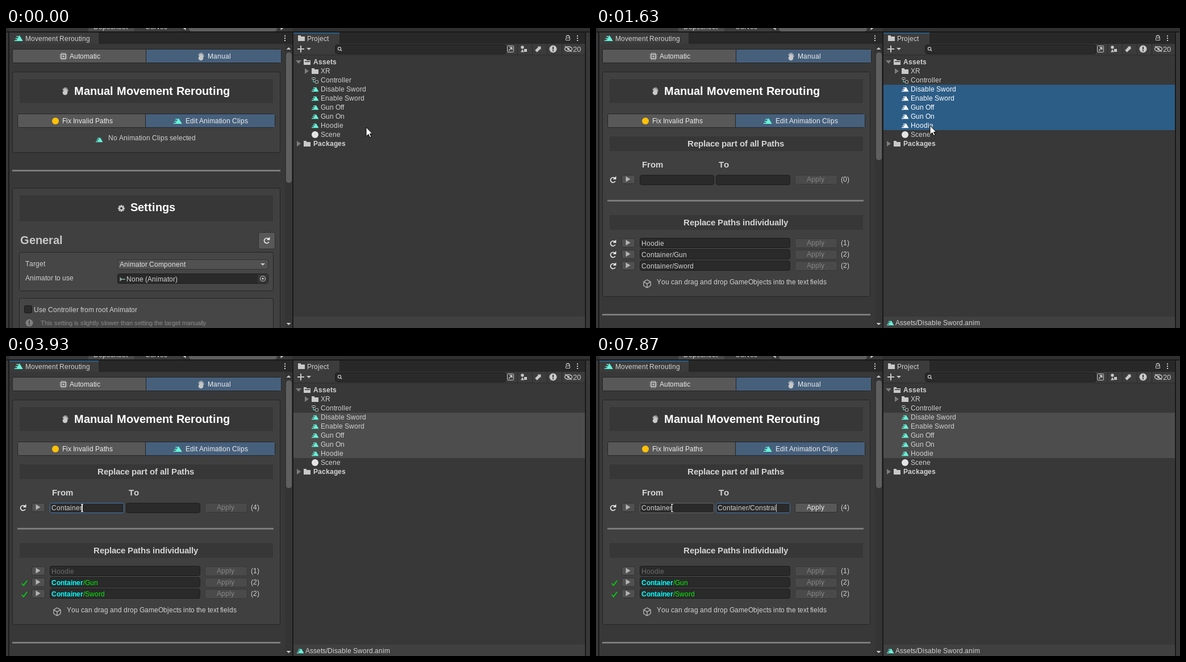
These frames come from a looping animation (1028x529 px, 8 s). An HTML page with a canvas:

```html
<!DOCTYPE html>
<html lang="en">
<head>
<meta charset="utf-8">
<title>Editor panel</title>
<style>
html, body { margin: 0; width: 100%; height: 100%; overflow: hidden; background: #383838; }
canvas { display: block; }
</style>
</head>
<body>
<canvas id="stage" width="1028" height="529"></canvas>
<script>
const g = document.getElementById('stage').getContext('2d');
const LOOP = 8000;
const TEAL = '#66f3da', BLUE = '#46607c', FOCUS = '#3a79bb', EDGE = '#242424', ICON = '#c8c8c8', TEXT = '#d2d2d2';
const CLIPS = ['Disable Sword', 'Enable Sword', 'Gun Off', 'Gun On', 'Hoodie'];
const TIME = { pickOne: 570, showOne: 800, pickAll: 1330, showAll: 1400, hover: 2100, focusFrom: 2200, beam: 2270, focusTo: 4370 };

const MOVES = [
  { start: 80, end: 330, dx: -44, dy: -72 },
  { start: 800, end: 1170, dx: -2, dy: 69 },
  { start: 1640, end: 2100, dx: -456, dy: 95 }
];
// Keys come in pairs: one pair per period, the second key a gap after the first.
const FROM_RUNS = [
  { text: 'C', start: 2670 },
  { text: 'ontainer', start: 2930, period: 273, gap: 180 }
];
const TO_RUNS = [
  { text: 'Container', start: 4830, period: 267, gap: 90 },
  { text: '/', start: 6430 },
  { text: 'Constrai', start: 6900, period: 305, gap: 55 }
];

function typed(runs, t) {
  return runs.map(({ text, start, period = 0, gap = 0 }) =>
    [...text].filter((_, i) => t >= start + Math.floor(i / 2) * period + i % 2 * gap).join('')).join('');
}

// ---------- primitives ----------
function rect(x0, y0, x1, y1, color) {
  g.fillStyle = color;
  g.fillRect(x0, y0, x1 - x0, y1 - y0);
}

function box(x0, y0, x1, y1, fill, border = EDGE, radius = 3) {
  g.beginPath();
  g.roundRect(x0 + .5, y0 + .5, x1 - x0 - 1, y1 - y0 - 1, radius);
  g.fillStyle = fill;
  g.fill();
  g.lineWidth = 1;
  g.strokeStyle = border;
  g.stroke();
}

// Advances snap to whole pixels, as in a hinted interface font.
function text(str, x, y, color = TEXT, size = 12, bold = false) {
  g.font = `${bold ? 'bold ' : ''}${size}px "Liberation Sans", Arial, sans-serif`;
  g.fillStyle = color;
  for (const ch of str) {
    g.fillText(ch, x, y);
    x += Math.round(g.measureText(ch).width);
  }
  return x;
}

const heading = (str, x, y, size, color = '#d4d4d4') => text(str, x, y, color, size, true);

function line(x0, y0, x1, y1, color = ICON, width = 1.5) {
  g.beginPath();
  g.moveTo(x0, y0);
  g.lineTo(x1, y1);
  g.strokeStyle = color;
  g.lineWidth = width;
  g.stroke();
}

function dot(x, y, r, color = ICON) {
  g.beginPath();
  g.arc(x, y, r, 0, 7);
  g.fillStyle = color;
  g.fill();
}

function ring(x, y, r, width = 1.5, from = 0, to = 2 * Math.PI, color = ICON) {
  g.beginPath();
  g.arc(x, y, r, from, to);
  g.strokeStyle = color;
  g.lineWidth = width;
  g.stroke();
}

// Triangle pointing right, turned by quarter turns.
function arrow(x, y, length, half, quarters = 0, color = ICON) {
  g.save();
  g.translate(x, y);
  g.rotate(quarters * Math.PI / 2);
  g.beginPath();
  g.moveTo(-length / 2, -half);
  g.lineTo(length / 2, 0);
  g.lineTo(-length / 2, half);
  g.fillStyle = color;
  g.fill();
  g.restore();
}

// ---------- icons ----------
function clipIcon(x, y, color = TEAL, scale = 1) {
  arrow(x + 1.5 * scale, y, 8.5 * scale, 5 * scale, 3, color);
  for (let i = 0; i < 3; i++) {
    const h = y + (i * 3 - 2.5) * scale;
    line(x - (3 + i * 1.5) * scale, h, x - (i * 1.5 - .5) * scale, h, color, 1.5);
  }
}

function handIcon(x, y) {
  dot(x, y + 3, 4.3);
  for (let i = 0; i < 5; i++) {
    const a = -2.3 + i * .5, reach = 7 - Math.abs(i - 1.8) * .6;
    line(x, y + 2, x + reach * Math.cos(a), y + 1 + 1.1 * reach * Math.sin(a), ICON, 1.8);
  }
}

function chipIcon(x, y) {
  for (const k of [-3, 0, 3]) {
    line(x + k, y - 6.5, x + k, y + 6.5, ICON, 1);
    line(x - 6.5, y + k, x + 6.5, y + k, ICON, 1);
  }
  [[4.5, ICON], [3, '#585858'], [1.5, ICON]].forEach(([r, color]) => rect(x - r, y - r, x + r, y + r, color));
}

function gearIcon(x, y) {
  for (let a = 0; a < 3; a += Math.PI / 4) {
    const c = 6 * Math.cos(a), s = 6 * Math.sin(a);
    line(x - c, y - s, x + c, y + s, ICON, 2.6);
  }
  dot(x, y, 4.6);
  dot(x, y, 2, '#373737');
}

function refreshIcon(x, y) {
  ring(x, y, 4.4, 1.8, .5, 5.4, '#e6e6e6');
  arrow(x + 4, y - 2.5, 4, 4, .5, '#e6e6e6');
}

function folderIcon(x, y, open) {
  rect(x - 6, y - 5, x - 1, y - 2, ICON);
  rect(x - 6, y - 3, x + 6, y + 5, ICON);
  if (open) rect(x - 4, y - 1.5, x + 5, y, '#383838');
}

function controllerIcon(x, y) {
  line(x - 3, y - 2, x - 3, y + 3, TEAL, 1);
  line(x - 3, y + 3, x + 1, y + 3, TEAL, 1);
  box(x - 6, y - 5, x + 1, y - 1, '#383838', ICON, 1);
  box(x, y, x + 6, y + 6, '#383838', ICON, 1);
}

function cubeIcon(x, y) {
  for (let i = 0; i < 6; i++) {
    const corner = k => [x + 7 * Math.sin(k * Math.PI / 3), y + 7 * Math.cos(k * Math.PI / 3)];
    line(...corner(i), ...corner(i + 1), ICON, 1.2);
    if (i % 2 === 0) line(x, y, ...corner(i), ICON, 1.2);
  }
}

function noticeIcon(x, y, color, mark) {
  dot(x, y, 6.5, color);
  rect(x - 1, y - 4, x + 1, y + 1, mark);
  rect(x - 1, y + 2, x + 1, y + 4, mark);
}

function checkIcon(x, y) {
  line(x - 4, y, x - 1, y + 4, '#00cc10', 2);
  line(x - 1.5, y + 4, x + 5, y - 5, '#00cc10', 2);
}

const kebab = (x, y) => [-4, 0, 4].forEach(k => rect(x - 1, y + k - 1, x + 1, y + k + 1, TEXT));

// ---------- left window ----------
const band = (y, height) => rect(24, y, 470, y + height, '#373737');
const separator = (x, y, end) => rect(x, y, end, y + 3, '#7b7b7b');
const field = (x0, x1, y, border = '#1c1c1c') => box(x0, y, x1, y + 18, '#2a2a2a', border);

function rowButtons(y, enabled, count) {
  box(45, y - 8, 69, y + 8, '#505050', '#303030');
  arrow(56.5, y - .5, 8, 5, 0, '#b4b4b4');
  box(350, y - 8, 425, y + 9, enabled ? '#585858' : '#4a4a4a', enabled ? '#2c2c2c' : '#383838');
  text('Apply', 371, y + 4, enabled ? '#eeeeee' : '#858585');
  text(`(${count})`, 431, y + 4);
}

function tabButtons(x0, mid, x1, y0, y1) {
  box(x0, y0, x1, y1, '#585858');
  rect(mid, y0 + 1, x1 - 1, y1 - 1, BLUE);
  rect(mid - 1, y0, mid, y1, EDGE);
}

function settings(dy) {
  g.save();
  g.translate(0, dy);
  separator(11, 250, 483);
  box(11, 282, 483, 620, '#404040');
  band(295, 46);
  gearIcon(203, 318);
  heading('Settings', 219, 323, 20, '#ffffff');
  heading('General', 25, 381, 20, '#c8c8c8');
  box(444, 360, 474, 390, '#585858', '#303030');
  refreshIcon(459, 375);

  box(23, 395, 471, 464, '#464646');
  text('Target', 34, 420);
  box(196, 408, 462, 426, '#515151', '#303030');
  text('Animator Component', 200, 421, '#e4e4e4');
  arrow(452, 417, 4, 4, 1);
  text('Animator to use', 34, 445);
  field(196, 462, 433);
  rect(443, 434, 461, 450, '#363636');
  arrow(202.5, 443, 4, 4, 0, '#8fae9f');
  line(203, 443, 210, 443, '#8fae9f');
  text('None (Animator)', 212, 447);
  ring(452, 442, 4.5, 1.2);
  dot(452, 442, 1.8);

  box(23, 476, 471, 600, '#464646');
  box(32, 489, 46, 503, '#2a2a2a', '#191919', 2);
  text('Use Controller from root Animator', 49, 501);
  noticeIcon(41, 520, '#808080', '#464646');
  text('This setting is slightly slower than setting the target manually', 61, 524, '#8a8a8a', 11);
  g.restore();
}

function replaceAll(t, from, to) {
  band(191, 26);
  heading('Replace part of all Paths', 161, 209, 15);
  heading('From', 81, 246, 15);
  heading('To', 216, 246, 15);
  refreshIcon(30, 268);
  rowButtons(267, to && to !== from, from ? 4 : 0);
  const inTo = t >= TIME.focusTo, inFrom = t >= TIME.focusFrom && !inTo;
  field(77, 208, 259, inFrom ? FOCUS : t >= TIME.hover ? '#656565' : undefined);
  field(211, 342, 259, inTo ? FOCUS : undefined);
  const fromEnd = text(from, 80, 272), toEnd = text(to, 214, 272);
  const caret = inTo ? toEnd : fromEnd;
  if (inTo || inFrom) rect(caret, 261, caret + 1, 275, '#d0d0d0');
  separator(20, 303, 471);
}

function replaceEach(rows, from) {
  band(330, 26);
  heading('Replace Paths individually', 154, 348, 15);
  rows.forEach(([path, count], i) => {
    const y = 379 + i * 20, match = from && path.startsWith(from);
    if (match) checkIcon(32, y + 2);
    else if (!from) refreshIcon(30, y + 1);
    rowButtons(y, false, count);
    field(77, 342, y - 9);
    if (match) text(path.slice(from.length), text(from, 80, y + 5, '#00ffff', 12, true), y + 5, '#00f000');
    else text(path, 80, y + 5, from ? '#6c6c6c' : TEXT);
  });
  const y = 392 + rows.length * 20;
  cubeIcon(90, y - 1);
  text('You can drag and drop GameObjects into the text fields', 107, y);
}

function scrollbar(grow) {
  rect(491, 28, 504, 529, '#343434');
  box(493, 43, 503, 43 + Math.round(230 / (1 + grow / 1207)), '#5f5f5f', '#5f5f5f', 4);
  arrow(497.5, 36, 4, 4, 3);
  arrow(497.5, 522, 4, 4, 1);
}

function leftWindow(t, from, to) {
  rect(4, 0, 6, 529, '#191919');
  rect(6, 8, 504, 28, '#282828');
  rect(6, 8, 163, 28, '#3c3c3c');
  if (t >= TIME.focusFrom) rect(6, 8, 163, 10, '#2c5d87');
  clipIcon(22, 18, TEAL, 1.2);
  text('Movement Rerouting', 34, 23);
  kebab(491, 18);

  tabButtons(11, 247, 485, 37, 62);
  chipIcon(101, 50);
  text('Automatic', 112, 54, '#eeeeee');
  handIcon(343, 50);
  text('Manual', 355, 54, '#eeeeee');

  const rows = t < TIME.showOne ? [] : [['Container/Sword', 1]];
  if (t >= TIME.showAll) rows.splice(0, 1, ['Hoodie', 1], ['Container/Gun', 2], ['Container/Sword', 2]);
  const grow = rows.length && 194 + rows.length * 20;
  box(11, 77, 483, 220 + grow, '#404040');
  band(90, 42);
  handIcon(104, 111);
  heading('Manual Movement Rerouting', 120, 118, 20, '#ffffff');
  tabButtons(20, 246, 474, 151, 176);
  dot(87, 164, 6, '#ffc107');
  text('Fix Invalid Paths', 99, 168, '#eeeeee');
  clipIcon(302, 164, TEAL, 1.2);
  text('Edit Animation Clips', 316, 168, '#eeeeee');
  if (rows.length) {
    replaceAll(t, from, to);
    replaceEach(rows, from);
  } else {
    clipIcon(164, 197);
    text('No Animation Clips selected', 180, 198);
  }
  settings(grow);
  scrollbar(grow);
}

// ---------- right window ----------
function toolbar() {
  rect(506, 28, 1019, 47, '#3c3c3c');
  rect(506, 47, 1019, 48, '#2a2a2a');
  line(513, 37, 525, 37, ICON, 2);
  line(519, 31, 519, 43, ICON, 2);
  arrow(533, 37, 4, 4, 1);
  box(579, 29, 881, 46, '#2a2a2a', '#1c1c1c', 4);
  ring(587, 36.5, 2.6, 1.2);
  line(589, 38.5, 591, 40.5);
  for (let x = 900; x < 990; x += 26) rect(x, 28, x + 1, 47, '#2a2a2a');

  box(882, 31, 894, 43, '#3c3c3c', ICON, 1);
  line(885, 40, 890, 35);
  arrow(890, 35, 4, 4, -.5);
  dot(909, 34, 2.7);
  arrow(909, 40, 5, 3, 3);
  rect(912, 37, 917, 42, ICON);
  line(933, 41, 939, 35, ICON, 5);
  arrow(940, 34, 4, 4, -.5);
  noticeIcon(963, 37, ICON, '#3c3c3c');
  g.beginPath();
  g.ellipse(990, 37, 6.5, 4, 0, 0, 7);
  g.lineWidth = 1.3;
  g.stroke();
  dot(990, 37, 2);
  line(984, 32, 996, 42);
  text('20', 998, 42, ICON, 13);
}

function tree(t) {
  const picked = t < TIME.pickOne ? 0 : t < TIME.pickAll ? 1 : CLIPS.length;
  const active = t < TIME.focusFrom;
  rect(506, 100, 1019, 100 + picked * 16, active ? '#2c5d87' : '#4d4d4d');
  arrow(515, 60, 6, 5, 1, '#7c7c7c');
  folderIcon(530, 60, true);
  heading('Assets', 541, 64, 12);
  arrow(529.5, 76, 7, 5, 0, '#7c7c7c');
  folderIcon(544, 76);
  text('XR', 554, 80);
  controllerIcon(544, 92);
  text('Controller', 554, 96);
  CLIPS.forEach((name, i) => {
    const lit = active && i < picked;
    clipIcon(544, 108 + i * 16, lit ? '#ffffff' : TEAL);
    text(name, 554, 112 + i * 16, lit ? '#ffffff' : TEXT);
  });
  dot(544, 188, 6, '#e4e4e4');
  text('Scene', 554, 192);
  arrow(515.5, 204, 7, 5, 0, '#7c7c7c');
  folderIcon(530, 204);
  heading('Packages', 541, 208, 12);
}

function rightWindow(t) {
  rect(504, 0, 506, 529, '#191919');
  rect(506, 8, 1019, 28, '#282828');
  rect(506, 8, 587, 28, '#3c3c3c');
  if (t < TIME.focusFrom) rect(506, 8, 587, 10, '#2c5d87');
  folderIcon(520, 18);
  text('Project', 530, 23);
  ring(989, 16, 2.8, 1.4, Math.PI, 2 * Math.PI + .6);
  box(985, 17, 993, 22, '#282828', ICON, 0);
  kebab(1006, 18);
  toolbar();
  tree(t);
  rect(506, 509, 1019, 529, '#404040');
  if (t >= TIME.showOne) {
    clipIcon(518, 520);
    text('Assets/Disable Sword.anim', 527, 524);
  }
  rect(1019, 8, 1021, 529, '#191919');
}

function topStrip() {
  rect(0, 0, 1028, 8, '#303030');
  rect(6, 0, 504, 6, '#383838');
  rect(145, 0, 226, 6, '#4a4a4a');
  rect(227, 0, 307, 6, '#3c3c3c');
  text('Dopesheet', 154, 2);
  text('Curves', 245, 2);
  arrow(314, 0, 5, 4, 2);
  box(322, -8, 477, 6, '#5f5f5f', '#5f5f5f', 4);
  arrow(486, 0, 5, 4);
  rect(0, 6, 1028, 8, '#191919');
}

// ---------- pointer ----------
function arrowPointer(x, y) {
  g.beginPath();
  [[0, 0], [0, 16], [4, 12.5], [6.5, 18], [9, 17], [6.5, 11.5], [11, 11.5]].forEach(([px, py]) => g.lineTo(x + px, y + py));
  g.closePath();
  g.fillStyle = '#ffffff';
  g.fill();
  g.strokeStyle = '#000000';
  g.lineWidth = 1;
  g.stroke();
}

function pointer(t) {
  if (t >= TIME.beam) {
    rect(133, 262, 134, 275, '#ffffff');
    for (const y of [261, 274]) rect(132, y, 136, y + 1, '#ffffff');
    return;
  }
  let x = 634, y = 175;
  for (const { start, end, dx, dy } of MOVES) {
    const k = Math.min(1, Math.max(0, (t - start) / (end - start)));
    const ease = k * k * (3 - 2 * k);
    x += dx * ease;
    y += dy * ease;
  }
  arrowPointer(Math.round(x), Math.round(y));
}

function draw(t) {
  rect(0, 0, 1028, 529, '#383838');
  leftWindow(t, typed(FROM_RUNS, t), typed(TO_RUNS, t));
  rightWindow(t);
  topStrip();
  pointer(t);
}

const start = performance.now();
function tick() {
  draw((performance.now() - start) % LOOP);
  requestAnimationFrame(tick);
}
tick();
</script>
</body>
</html>
```
